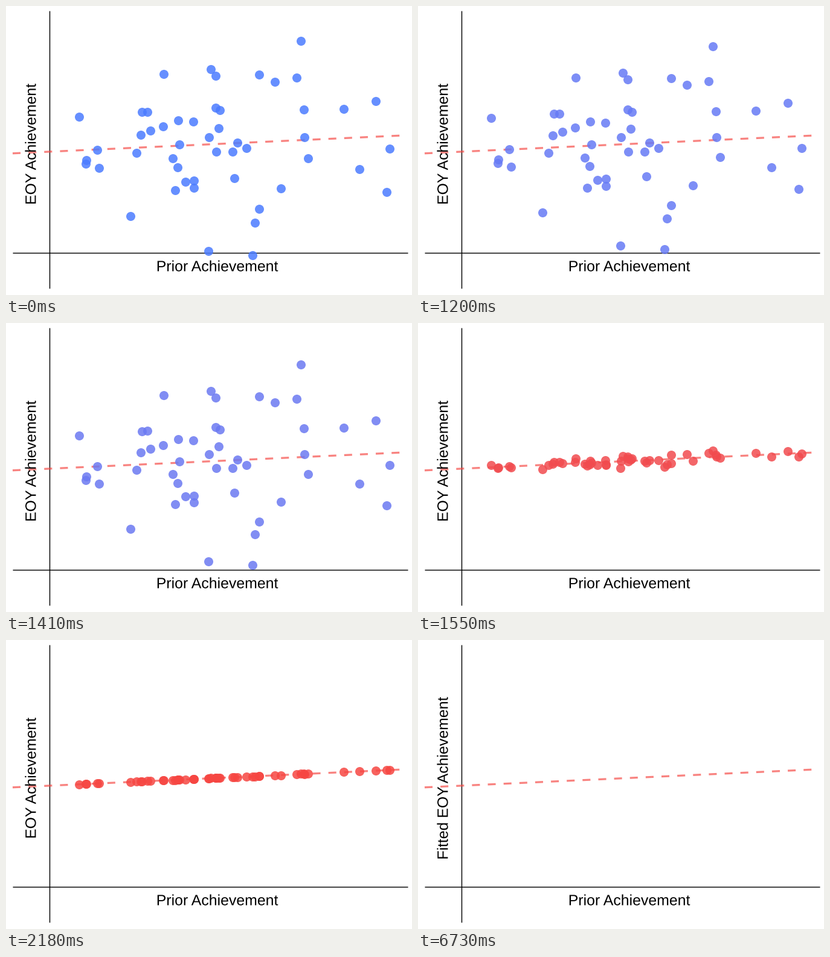
Animation, 672 px wide and 480 px high, one loop 6.87 s. Source, as a matplotlib script:

```python
import numpy as np
import matplotlib.pyplot as plt
from matplotlib.animation import FuncAnimation
from matplotlib.patches import PathPatch
from matplotlib.textpath import TextPath
from matplotlib.transforms import Affine2D

W, H, DPI = 672, 480, 96
PX = 72 / DPI  # points per pixel
LOOP, TICK = 6870, 15

# The tween runs in equal steps; label and dots switch later
START, STEP, STEPS = 430, 70, 30
RELABEL, HIDE = 2880, 6730

BLUE = (75, 124, 255)
RED = (246, 70, 66)
FONT_PX = 24.85

POINTS = np.array([
    (121.3, 183.5), (131.5, 262), (133.2, 255.8), (150.8, 238.5), (153.5, 268.8),
    (206, 349), (216.3, 244.2), (223, 213.6), (224.5, 176), (233.6, 175.5),
    (238.8, 207.3), (260, 200.4), (261.2, 112.5), (275.9, 252.8), (280, 305.8),
    (283.6, 268), (284.8, 190.2), (286.8, 230), (296.8, 291.8), (310, 192.1),
    (310.8, 290.4), (310.9, 302.4), (335, 407.4), (335.7, 217.7), (338.6, 104.9),
    (346.6, 116.1), (347, 168.8), (347.8, 242.2), (351.5, 203.1), (353.9, 173.1),
    (374.7, 242.3), (377.6, 285.7), (382.8, 227.3), (397.5, 236.2), (408.4, 413.9),
    (412.1, 360.1), (418.6, 337), (418.6, 114.3), (445, 125.7), (454.8, 302.5),
    (481.4, 119.1), (488.3, 58.2), (493.2, 172.1), (493.7, 217.7), (499.6, 252.8),
    (558.8, 171.2), (585.1, 270.6), (612.2, 158.2), (629.6, 308.8), (634.8, 237),
])

XYZ = np.array([[0.4124, 0.3576, 0.1805],
                [0.2126, 0.7152, 0.0722],
                [0.0193, 0.1192, 0.9505]])
WHITE = XYZ.sum(axis=1)


def fit(x):
    return 239.7 - 0.0461 * (x - 121)


def to_lab(rgb):
    c = np.array(rgb) / 255
    lin = np.where(c > 0.04045, ((c + 0.055) / 1.055) ** 2.4, c / 12.92)
    v = XYZ @ lin / WHITE
    x, y, z = np.where(v > 0.008856, np.cbrt(v), 7.787 * v + 16 / 116)
    return np.array([116 * y - 16, 500 * (x - y), 200 * (y - z)])


def to_rgb(lab):
    y = (lab[0] + 16) / 116
    v = np.array([y + lab[1] / 500, y, y - lab[2] / 200])
    v = np.where(v > 0.2069, v ** 3, (v - 16 / 116) / 7.787)
    lin = np.clip(np.linalg.solve(XYZ, v * WHITE), 0, 1)
    return np.clip(np.where(lin > 0.0031308, 1.055 * lin ** (1 / 2.4) - 0.055, 12.92 * lin), 0, 1)


LAB_BLUE, LAB_RED = to_lab(BLUE), to_lab(RED)


def elastic(p):
    """Elastic ease in and out."""
    if p in (0, 1):
        return p
    if p > 0.5:
        return 1 - elastic(1 - p)
    q = 2 * p
    return 0.5 * np.sin(6.5 * np.pi * q) * 2 ** (10 * (q - 1))


fig = plt.figure(figsize=(W / DPI, H / DPI), dpi=DPI, facecolor="white")
ax = fig.add_axes([0, 0, 1, 1])
ax.set_xlim(0, W)
ax.set_ylim(H, 0)
ax.axis("off")


def line(xs, ys, color, width, **kw):
    return ax.plot(xs, ys, color=color, lw=width * PX, solid_capstyle="butt", **kw)[0]


def label(text, x, y, upright=False):
    """Text centred along its run; the other coordinate is the baseline."""
    path = TextPath((0, 0), text, size=FONT_PX, prop={"family": "Liberation Sans"})
    box = path.get_extents()
    move = Affine2D().translate(-(box.x0 + box.x1) / 2, 0).scale(1, -1)
    if upright:
        move.rotate_deg(-90)
    path = move.translate(x, y).transform_path(path)
    return ax.add_patch(PathPatch(path, fc="black", lw=0, zorder=5))


line([71.6, 71.6], [8, 468.5], "black", 1.45, zorder=1)
line([11, 664.5], [410.4, 410.4], "black", 1.45, zorder=1)
ends = np.array([11, 652])
line(ends, fit(ends), np.array(RED) / 255, 3.27, alpha=0.67, zorder=2,
     dashes=(4, 4), dash_capstyle="butt")

dots = ax.scatter(*POINTS.T, s=(15 * PX) ** 2, linewidths=0, alpha=0.85, zorder=3)

label("Prior Achievement", 350.5, 440.5)
raw_label = label("EOY Achievement", 49.4, 228.6, upright=True)
fit_label = label("Fitted EOY Achievement", 49.4, 228.8, upright=True)


def draw(i):
    t = i * TICK + TICK - 1
    k = min(max((t - START) // STEP, 0), STEPS)
    f = elastic(k / STEPS)
    x, y = POINTS.T
    dots.set_offsets(np.column_stack([x, y + f * (fit(x) - y)]))
    dots.set_facecolor(to_rgb(LAB_BLUE + f * (LAB_RED - LAB_BLUE)))
    dots.set_visible(t < HIDE)
    raw_label.set_visible(t < RELABEL)
    fit_label.set_visible(t >= RELABEL)
    return dots, raw_label, fit_label


anim = FuncAnimation(fig, draw, frames=LOOP // TICK, interval=TICK,
                     repeat=True, repeat_delay=0)
plt.show()
```
